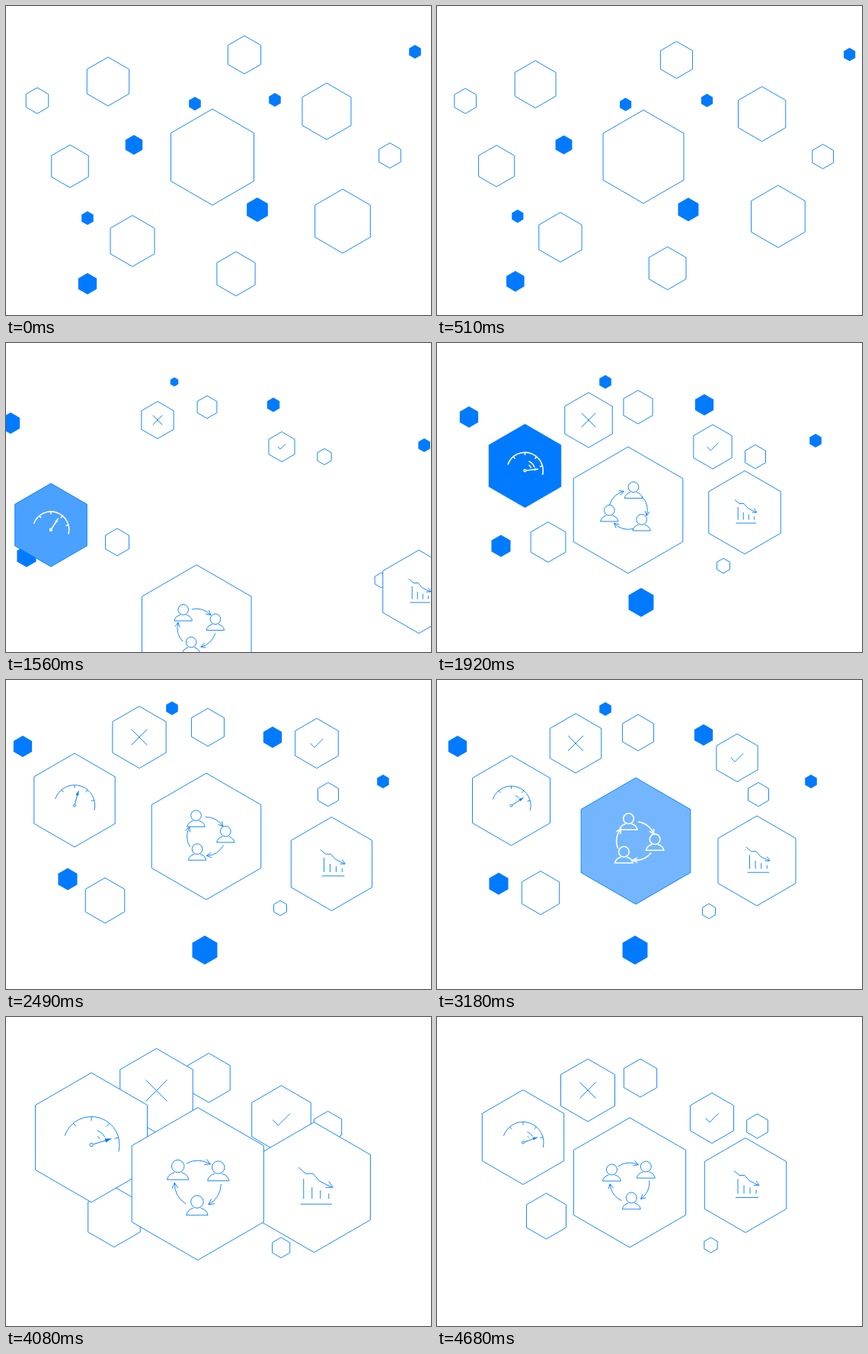
An HTML page with a canvas for the animation above (4.71 s loop, 558 px wide and 405 px high).

```html
<!DOCTYPE html>
<html lang="en">
<head>
<meta charset="utf-8">
<title>Hexagons</title>
<style>
html, body { margin: 0; width: 100%; height: 100%; overflow: hidden; background: #fff; }
canvas { display: block; }
</style>
</head>
<body>
<canvas id="stage" width="558" height="405"></canvas>
<script>
const ctx = document.getElementById('stage').getContext('2d');
const LOOP = 4710, STEP = 30, BLUE = '#007aff';
const RAD = Math.PI / 180;

// Smooth monotone interpolation through (times, values)
function track(t, times, values) {
  const last = times.length - 1;
  if (t <= times[0]) return values[0];
  if (t >= times[last]) return values[last];
  let i = 0;
  while (t >= times[i + 1]) i++;
  const slope = k => (values[k + 1] - values[k]) / (times[k + 1] - times[k]);
  const tangent = k => {
    if (k === 0 || k === last) return 0;
    const a = slope(k - 1), b = slope(k);
    return a * b > 0 ? 2 * a * b / (a + b) : 0;
  };
  const d = times[i + 1] - times[i], u = (t - times[i]) / d, v = 1 - u;
  return values[i] * v * v * (1 + 2 * u) + values[i + 1] * u * u * (3 - 2 * u)
    + d * u * v * (v * tangent(i) - u * tangent(i + 1));
}

function hexPath(x, y, r) {
  ctx.beginPath();
  for (let i = 0; i < 6; i++) {
    const a = (60 * i - 90) * RAD;
    ctx.lineTo(x + r * Math.cos(a), y + r * Math.sin(a));
  }
  ctx.closePath();
}

function hex(x, y, r, fill, outlined) {
  if (r < 0.5) return;
  hexPath(x, y, r);
  ctx.fillStyle = fill;
  ctx.fill();
  if (!outlined) return;
  ctx.strokeStyle = BLUE;
  ctx.lineWidth = 0.9;
  ctx.stroke();
}

function line(...p) {
  ctx.beginPath();
  for (let i = 0; i < p.length; i += 2) ctx.lineTo(p[i], p[i + 1]);
  ctx.stroke();
}

function arc(x, y, r, from, to) {
  ctx.beginPath();
  ctx.arc(x, y, r, from * RAD, to * RAD);
  ctx.stroke();
}

function arrowHead(x, y, deg, size) {
  const leg = d => [x - size * Math.cos((deg + d) * RAD), y - size * Math.sin((deg + d) * RAD)];
  line(...leg(28), x, y, ...leg(-28));
}

// Icons are drawn around 0,0 at the resting size of their hexagon
const icons = {
  gauge(t) {
    const needle = track(t, [1500, 1920, 2490, 3180, 3630, 4680], [-60, -6, -75, -33, -15, -20]);
    ctx.save();
    ctx.translate(0, 7);
    arc(0, 0, 27, -161, 14);
    for (const a of [-130, -90, -50, -15]) {
      const c = Math.cos(a * RAD), s = Math.sin(a * RAD);
      line(27 * c, 27 * s, 23 * c, 23 * s);
    }
    if (needle > -50) {
      arc(0, 0, 15, -68, needle - 12);
      arc(0, 0, 10, -55, needle - 16);
    }
    arc(0, 0, 1.6, 0, 360);
    ctx.rotate(needle * RAD);
    line(2, 0, 20, 0);
    ctx.beginPath();
    ctx.moveTo(20, 0);
    ctx.lineTo(14, -2);
    ctx.lineTo(14, 2);
    ctx.fill();
    ctx.restore();
  },
  cross() {
    line(-10.5, -10.5, 10.5, 10.5);
    line(-10.5, 10.5, 10.5, -10.5);
  },
  check() {
    line(-8.5, 0, -3, 5.5, 8.5, -6);
  },
  chart() {
    line(-15, -19, -8, -13, -1, -13, 5, -6, 17, 0);
    arrowHead(18, 0, 27, 7);
    [-8, 0, 3, 6].forEach((top, i) => line(8 * i - 10, top, 8 * i - 10, 11));
    line(-13, 16, 17, 16);
  },
  people(t) {
    const spin = track(t, [1200, 1920, 2490, 3180, 3630, 4680], [-50, 46, 118, 128, 216, 205]);
    for (let a = spin; a < spin + 360; a += 120) {
      const x = 26 * Math.cos(a * RAD), y = 26 * Math.sin(a * RAD);
      arc(x, y - 6, 7, 0, 360);
      ctx.beginPath();
      ctx.moveTo(x - 4, y + 1);
      ctx.quadraticCurveTo(x - 11, y + 3, x - 12, y + 9);
      ctx.lineTo(x + 12, y + 9);
      ctx.quadraticCurveTo(x + 11, y + 3, x + 4, y + 1);
      ctx.stroke();
      const end = a + 91;
      arc(0, 0, 26, a + 29, end);
      arrowHead(26 * Math.cos(end * RAD), 26 * Math.sin(end * RAD), end + 82, 7);
    }
  }
};

// Opening cluster: start x, y, radius, later x, y
const openOutlines = [
  [134, 99, 32, 162, 112], [313, 64, 25, 305, 87], [41, 124, 17, 59, 126],
  [421, 138, 37, 388, 150], [504, 196, 16.5, 492, 199], [84, 210, 28, 116, 209],
  [271, 198, 63, 270, 197], [442, 282, 42, 409, 262], [302, 351, 29, 299, 326],
  [166, 308, 33.5, 190, 291]
];
const openSolids = [
  [537, 60, 9, 515, 73], [248, 128, 9, 250, 132], [353, 123, 9, 346, 126],
  [168, 182, 13, 175, 182], [330, 267, 16, 331, 266], [107, 278, 9, 112, 269],
  [107, 364, 14, 128, 352]
];

const POSES = [1920, 2490, 3180, 3630];
const cell = (r, xs, ys, options = {}) => ({ r, xs, ys, ...options });

const cells = [
  cell(25, [264, 265, 264, 265, 267], [84, 62, 69, 79, 80]),
  cell(16, [418, 423, 422, 425, 420.5], [149, 150, 150, 147, 143], { steady: true }),
  cell(30, [146, 130, 136, 139, 143.5], [261, 289, 279, 265, 261]),
  cell(10, [376, 360, 357, 363, 359.5], [292, 299, 303, 306, 299], { steady: true, from: [600, 330] }),
  cell(41, [199, 175, 182, 196, 198], [101, 75, 83, 97, 96], { icon: 'cross' }),
  cell(33, [362, 408, 394, 363, 361], [136, 83, 102, 137, 132.5], { icon: 'check' }),
  cell(62, [115.5, 90, 97.5, 109.5, 113], [161, 157.5, 158, 158.5, 157.5],
    { icon: 'gauge', from: [-45, 377], enter: 1020, hot: [[1400, 1650, 2000, 2250], [0, 1, 1, 0]] }),
  cell(62, [404, 427.5, 420, 404, 405], [222, 241, 237, 229, 220.5],
    { icon: 'chart', from: [680, 430], alpha: [[3350, 3600, 3680, 3800], [1, 0, 0, 1]] }),
  cell(85, [251, 263, 261, 250.5, 253], [219, 205, 211, 220.5, 217],
    { icon: 'people', from: [250, 520], steady: true, hot: [[2950, 3180, 3300, 3520], [0, 0.55, 1, 0]] })
];

// Solids slide behind their host cell
const solids = [
  cell(14, [42, 22, 27, 59], [97, 87, 87, 116], { host: 6, from: [-30, 110] }),
  cell(9, [221, 218, 221, 207], [51, 37, 38, 63], { host: 4 }),
  cell(14, [351, 350, 350, 303], [81, 75, 72, 75], { host: 0 }),
  cell(9, [497, 495, 491, 430], [128, 133, 133, 133], { host: 1, from: [600, 140] }),
  cell(14.5, [84, 81, 81, 108], [266, 261, 267, 264], { host: 2, from: [-30, 290] }),
  cell(19, [268, 261, 260, 258], [340, 354, 354, 308], { host: 8, from: [280, 440] })
];

function place(c, t, endTime, end) {
  const from = c.from || [c.xs[0], c.ys[0]];
  const times = [c.enter || 1200, ...POSES, endTime];
  const at = (values, k) => track(t, times, [from[k], ...values.slice(0, 4), end[k]]);
  return [at(c.xs, 0), at(c.ys, 1)];
}

const grow = (c, t) => c.from ? 1 : track(t, [1250, 1750], [0, 1]);

function drawOpening(t) {
  const draw = ([x, y, r, x2, y2], outlined) => {
    const times = [0, 250, 1020, 1500];
    const px = track(t, times, [x, x - 0.4 * (x2 - x), x2, (x2 + 270) / 2]);
    const py = track(t, [0, 1020, 1500], [y, y2, (y2 + 200) / 2]);
    const size = r * track(t, [0, 1020, 1500], [1, 0.89, 0]);
    hex(px, py, size, outlined ? '#fff' : BLUE, outlined);
  };
  openOutlines.forEach(h => draw(h, true));
  openSolids.forEach(h => draw(h, false));
}

function drawSolid(c, t) {
  const host = cells[c.host];
  const [x, y] = place(c, t, 3820, [host.xs[4], host.ys[4]]);
  hex(x, y, c.r * grow(c, t), BLUE, false);
}

function drawCell(c, t, i) {
  let [x, y] = place(c, t, 4500, [c.xs[4], c.ys[4]]);
  if (c.enter && t < c.enter) {
    x -= (c.enter - t) * 0.25;
    y += (c.enter - t) * 0.25;
  }
  const peak = 3960 + 15 * i;
  const pop = c.icon === 'people'
    ? track(t, [3780, 4200, 4620], [1, 1.22, 1])
    : track(t, [3720, peak, 4340], [1, 1.38, 1]);
  const pose = c.steady ? track(t, [3180, 3630, 3780], [0.975, 1.03, 1])
    : track(t, [...POSES, 3780], [0.88, 0.99, 0.95, 0.925, 1]);
  const scale = pose * pop * grow(c, t);
  if (scale < 0.02) return;

  ctx.save();
  ctx.globalAlpha = c.alpha ? track(t, ...c.alpha) : 1;
  hex(x, y, c.r * scale, '#fff', true);
  const heat = c.hot ? track(t, ...c.hot) : 0;
  if (heat > 0) {
    ctx.globalAlpha = heat;
    hex(x, y, c.r * scale, BLUE, false);
    ctx.globalAlpha = 1;
  }
  if (c.icon) {
    const hot = heat > 0.3;
    ctx.translate(x, y);
    ctx.scale(scale, scale);
    ctx.strokeStyle = ctx.fillStyle = hot ? '#fff' : BLUE;
    ctx.lineWidth = (hot ? 1.6 : 0.9) / scale;
    icons[c.icon](t);
  }
  ctx.restore();
}

function render(t) {
  ctx.fillStyle = '#fff';
  ctx.fillRect(0, 0, 558, 405);
  if (t < 1500) drawOpening(t);
  if (t > 1200 && t < 3820) solids.forEach(c => drawSolid(c, t));
  cells.forEach((c, i) => drawCell(c, t, i));
}

const start = performance.now();
function tick() {
  const t = (performance.now() - start) % LOOP;
  render(Math.floor(t / STEP) * STEP);
  requestAnimationFrame(tick);
}
tick();
</script>
</body>
</html>
```
